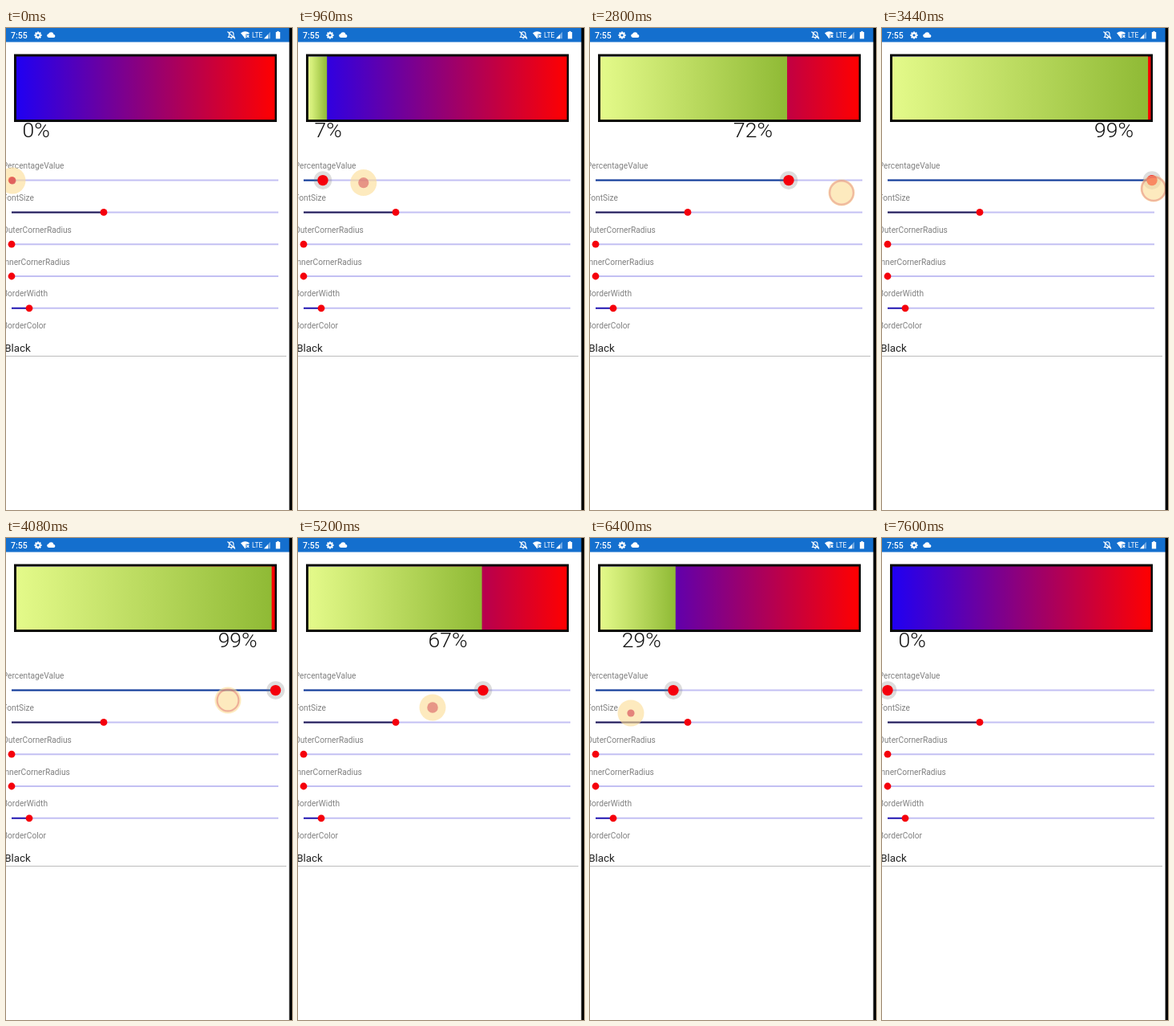
An HTML page with a canvas that plays this animation: 357x600 px, repeating every 7680 ms.

```html
<!DOCTYPE html>
<html lang="en">
<head>
<meta charset="utf-8">
<title>Percentage bar</title>
<style>
html, body { margin: 0; width: 100%; height: 100%; overflow: hidden; background: #fff; }
canvas { display: block; }
</style>
</head>
<body>
<canvas id="stage" width="357" height="600"></canvas>
<script>
const c = document.getElementById('stage').getContext('2d');
const LOOP = 7680, STEP = 80;
const LEFT = 7, RIGHT = 340;

// [time, value...] keys, joined by straight lines
const thumbKeys = [[0, 7.3], [480, 7.3], [800, 18], [1760, 96], [2800, 248], [3420, 337],
  [4080, 336.5], [4240, 331], [5200, 231], [6400, 104], [7300, 7]];
const fingerKeys = [[0, 8, 190], [100, 8, 190], [400, 25, 191], [1100, 96, 193], [1760, 180, 197],
  [2800, 314, 205], [3020, 340, 205], [3430, 340, 200], [4080, 277, 202], [5200, 168, 211],
  [6400, 51, 218], [6840, 8, 219]];

function at(keys, t, n = 1) {
  const i = keys.findIndex(k => k[0] > t);
  if (i < 0) return keys[keys.length - 1][n];
  const a = keys[i - 1], b = keys[i];
  return a[n] + (b[n] - a[n]) * (t - a[0]) / (b[0] - a[0]);
}

function rect(x, y, w, h, fill) {
  c.fillStyle = fill;
  c.fillRect(x, y, w, h);
}

function disc(x, y, r, fill, hole = 0) {
  c.fillStyle = fill;
  c.beginPath();
  c.arc(x, y, r, 0, 7);
  if (hole > 0) {
    c.moveTo(x + hole, y);
    c.arc(x, y, hole, 0, 2 * Math.PI, true);
  }
  c.fill();
}

function shape(d, fill) {
  c.fillStyle = fill;
  c.fill(new Path2D(d));
}

function line(x1, y1, x2, y2, color, width) {
  c.strokeStyle = color;
  c.lineWidth = width;
  c.beginPath();
  c.moveTo(x1, y1);
  c.lineTo(x2, y2);
  c.stroke();
}

function text(s, x, y, size, color, weight = 400) {
  c.font = `${weight} ${size}px Roboto, sans-serif`;
  c.fillStyle = color;
  c.fillText(s, x, y);
}

function blend(x1, x2, ...colors) {
  const g = c.createLinearGradient(x1, 0, x2, 0);
  colors.forEach((color, i) => g.addColorStop(i / (colors.length - 1), color));
  return g;
}

function statusBar() {
  const blue = '#146fce', white = '#fff';
  rect(0, 0, 354, 17.5, blue);
  text('7:55', 6, 12.7, 10.5, white, 500);
  // gear
  for (let i = 0; i < 4; i++) {
    const a = i * Math.PI / 4, x = 4.6 * Math.cos(a), y = 4.6 * Math.sin(a);
    line(40 - x, 9 - y, 40 + x, 9 + y, white, 2);
  }
  disc(40, 9, 3.6, white);
  disc(40, 9, 1.6, blue);
  // cloud
  disc(53.6, 9.6, 2.4, white);
  disc(56.3, 8.4, 3.1, white);
  disc(59.4, 10, 2, white);
  rect(53.6, 9.5, 5.8, 2.5, white);
  // muted bell
  c.strokeStyle = white;
  c.lineWidth = 1.1;
  c.stroke(new Path2D('M277.5 11.5h7.5l-1-1.5v-2.5a2.7 2.7 0 0 0-5.4 0v2.5z'));
  rect(280.3, 12.3, 2, 1.2, white);
  line(276.5, 4.5, 286, 13.5, white, 1.1);
  // wifi
  shape('M293 6.2q5.5-4 11 0l-5.5 7z', white);
  rect(299.5, 7.6, 5, 6, blue);
  line(300.3, 8.6, 303.3, 11.8, white, 1.2);
  line(303.3, 8.6, 300.3, 11.8, white, 1.2);
  text('LTE', 307, 12.2, 8.5, white);
  // signal and battery
  shape('M322 13.2l8-8.4v8.4z', 'rgba(255,255,255,.4)');
  shape('M322 13.2l5-5.2v5.2z', white);
  rect(336.8, 5, 5.4, 8.4, white);
  rect(338.4, 3.9, 2.2, 1.4, white);
}

function slider(y, x, color) {
  line(LEFT, y, RIGHT, y, '#c3c0f3', 2);
  if (x > LEFT + 1) line(LEFT, y, x, y, color, 2);
}

function bar(p) {
  const edge = 13 + p * 322;
  rect(10, 32.5, 328, 84.5, '#0a0a0a');
  rect(13, 35.5, 322.5, 78.5, blend(13, 336, '#2000f2', '#ff0000'));
  if (p > 0.004) rect(13, 35.5, edge - 13, 78.5, blend(13, edge, '#e4fa8a', '#bada5f', '#8fba35'));
  const label = Math.round(p * 100) + '%';
  c.font = '300 26.5px Roboto, sans-serif';
  const x = Math.max(20.5, edge - c.measureText(label).width - 18);
  text(label, x, 136, 26.5, '#111', 300);
}

function finger(t) {
  const x = at(fingerKeys, t), y = at(fingerKeys, t, 2);
  const p = t / 705 % 1;
  const r = 4.5 + 11.5 * Math.min(1, p * p * 1.4);
  const hole = r * Math.min(0.85, (p - 0.4) * 4);
  disc(x, y, 16.5, 'rgba(252,222,150,.62)');
  disc(x, y, r, `rgba(214,80,90,${0.7 - 0.4 * p})`, hole);
}

function draw(t) {
  rect(0, 0, 357, 600, '#fff');
  const thumb = at(thumbKeys, t);
  const p = Math.max(0, (thumb - LEFT) / (RIGHT - LEFT));
  statusBar();
  bar(p);

  ['PercentageValue', 'FontSize', 'OuterCornerRadius', 'InnerCornerRadius', 'BorderWidth', 'BorderColor']
    .forEach((s, i) => text(s, -4.3, 175.2 + i * 39.8, 10.2, '#808080'));
  text('Black', -1.8, 403.2, 13.4, '#222');
  line(0, 408.5, 350, 408.5, '#bdbdbd', 1);

  slider(189.6, thumb, '#0c3a96');
  [[122, '#1b1552'], [7, ''], [7, ''], [29, '#2a1fb4']].forEach(([x, color], i) => {
    const y = 229.4 + i * 39.8;
    slider(y, x, color);
    disc(x, y, 4.4, '#f5000c');
  });

  const pressed = t >= 480;
  if (pressed) disc(thumb, 189.6, 11.3, 'rgba(120,120,120,.25)');
  disc(thumb, 189.6, pressed ? 6.7 : 4.6, '#f5000c');
  if (t < 7280) finger(t);
  rect(353.6, 0, 3.4, 600, '#000');
}

const start = performance.now();
function tick() {
  const t = (performance.now() - start) % LOOP;
  draw(Math.floor(t / STEP) * STEP);
  requestAnimationFrame(tick);
}
tick();
</script>
</body>
</html>
```
